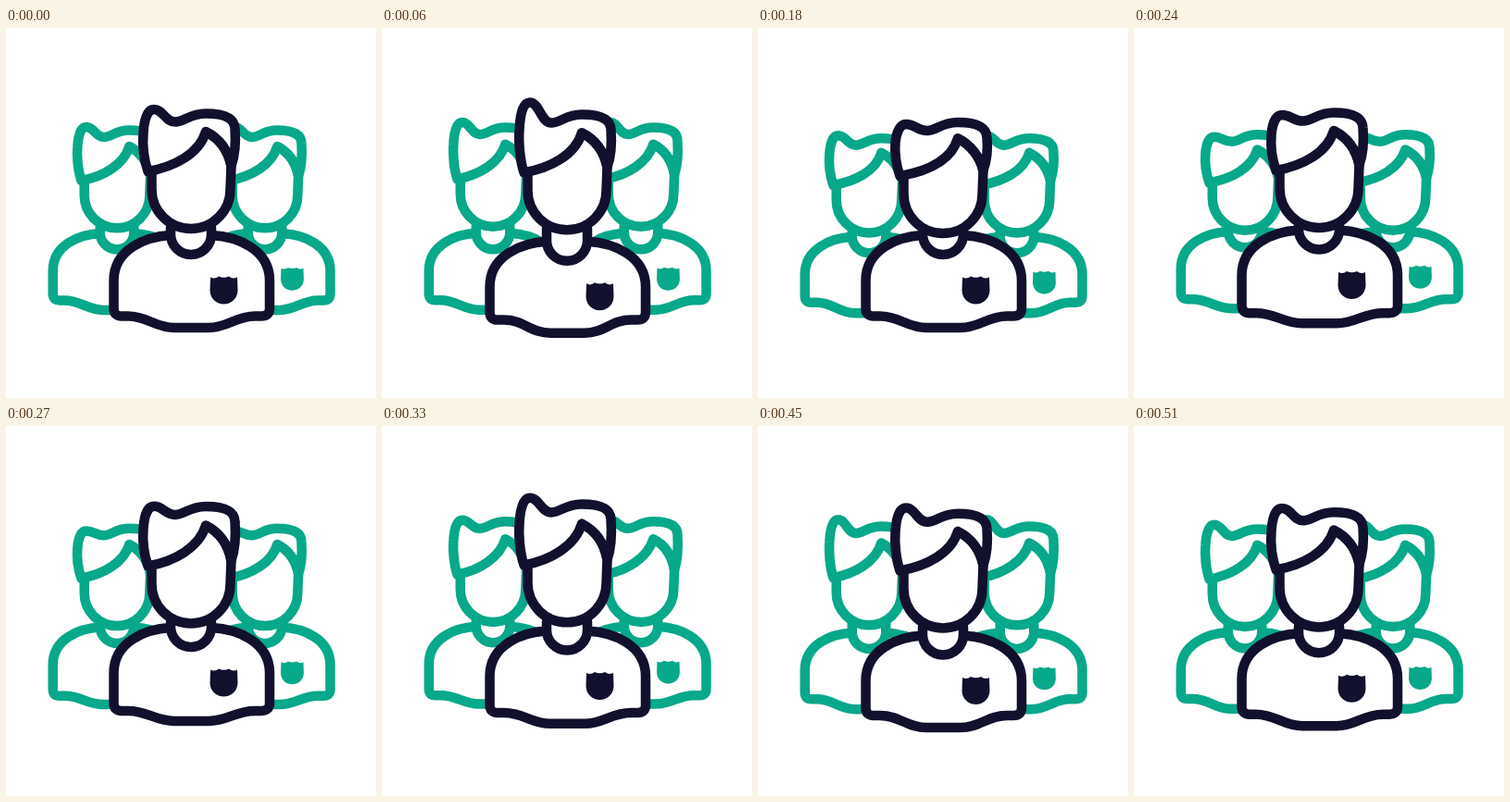
These frames come from a looping animation (400x400 px, 540 ms). An HTML page with a canvas:

```html
<!DOCTYPE html>
<html lang="en">
<head>
<meta charset="utf-8">
<title>Team bounce</title>
<style>
html, body { margin: 0; width: 100%; height: 100%; overflow: hidden; background: #fff; }
canvas { display: block; width: 400px; height: 400px; }
</style>
</head>
<body>
<canvas id="stage" width="400" height="400"></canvas>
<script>
const ctx = document.getElementById('stage').getContext('2d');
const LOOP = 540, STEP = 30, PERIOD = 360, RAMP = 60;
const LAG = 45; // the side figures follow the front one

// Fading swing; parts further from the hips swing wider and later.
function swing(t, size, delay) {
  const ramp = Math.min(1, t / RAMP, (LOOP - t) / RAMP);
  const fade = 1 - (t / LOOP) ** 2;
  return size * ramp * fade * Math.sin(2 * Math.PI * (t - delay) / PERIOD);
}

function person(cx, scale, dy, lift, color, time) {
  const t = (time + LOOP) % LOOP;
  const b = swing(t, 8, 0);            // shoulders, neck and badge
  const hem = b * 0.85, c = b * 0.6;   // bottom edge and its corners
  const h = swing(t, 7.5, 50);         // head
  const r = swing(t, 13, 55) - lift;   // top of the hair
  const tip = swing(t, 18, 85) - lift; // quiff
  const m = (h + tip) / 2, p = (h + r) / 2;

  // Geometry is scaled, line weight is not.
  function shape(build, fill, line = true) {
    ctx.setTransform(scale, 0, 0, scale, cx - 200 * scale, dy);
    ctx.beginPath();
    build();
    ctx.setTransform(1, 0, 0, 1, 0, 0);
    ctx.fillStyle = fill;
    ctx.fill();
    if (line) ctx.stroke();
  }
  const move = (x, y) => ctx.moveTo(x, y);
  const to = (x, y) => ctx.lineTo(x, y);
  const curve = (...a) => ctx.bezierCurveTo(...a);
  const bend = (...a) => ctx.quadraticCurveTo(...a);
  const parting = () => curve(240, 132 + p, 230, 119 + p, 216, 112 + p);

  ctx.strokeStyle = color;
  ctx.lineWidth = 10.5;
  ctx.lineJoin = ctx.lineCap = 'round';

  // Torso
  shape(() => {
    move(178, 224 + b);
    curve(151, 225.5 + b, 116.5, 239 + b, 116.5, 273 + b);
    to(116.5, 303 + c);
    bend(116.5, 311.5 + c, 125, 311.5 + c);
    to(132, 311.5 + c);
    curve(153, 311.5 + c, 161, 324 + hem, 182, 324 + hem);
    to(219, 324 + hem);
    curve(240, 324 + hem, 248, 311.5 + c, 269, 311.5 + c);
    to(276, 311.5 + c);
    bend(285, 311.5 + c, 285, 303 + c);
    to(285, 273 + b);
    curve(285, 239 + b, 250, 225.5 + b, 222, 224 + b);
  }, '#fff');

  // Neck
  shape(() => {
    move(178, 216 + h);
    to(178, 223 + b);
    ctx.arc(200, 223 + b, 22, Math.PI, 0, true);
    to(222, 216 + h);
  }, '#fff');

  // Badge
  shape(() => {
    move(221, 269.5 + b);
    bend(226, 272 + b, 230, 268.5 + b);
    bend(235.5, 271 + b, 241, 268.5 + b);
    bend(245, 272 + b, 250, 269.5 + b);
    to(250.5, 284 + b);
    curve(250, 294 + b, 242, 298.5 + b, 235.5, 298.5 + b);
    curve(229, 298.5 + b, 221, 294 + b, 220.5, 284 + b);
  }, color, false);

  // Face
  shape(() => {
    move(157.5, 155 + h);
    to(157.5, 174.5 + h);
    ctx.arc(200, 174.5 + h, 42.5, Math.PI, 0, true);
    to(243.5, 149 + h);
    parting();
  }, '#fff');

  // Hair
  shape(() => {
    move(153.5, 155 + h);
    curve(149, 142 + h, 147.5, 125 + m, 148.5, 113 + m);
    curve(149.5, 98 + tip, 153, 88 + tip, 160, 88 + tip);
    curve(170, 88 + tip, 172, 101.5 + r, 183, 101.5 + r);
    curve(193, 101.5 + r, 198, 92.5 + r, 216, 92.5 + r);
    curve(236, 92.5 + r, 247, 97 + r, 247.5, 109 + r);
    curve(248.5, 122 + p, 248.5, 135 + h, 243.5, 149 + h);
    parting();
    curve(209, 136 + p, 182, 150 + h, 153.5, 155 + h);
    ctx.closePath();
  }, '#fff');
}

function draw(now) {
  const t = Math.floor((now % LOOP) / STEP) * STEP;
  ctx.fillStyle = '#fff';
  ctx.fillRect(0, 0, 400, 400);
  for (const x of [120, 280]) person(x, 0.83, 35.5, 3.6, '#08a88a', t - LAG);
  person(200, 1, 0, 0, '#11102d', t);
}

const start = performance.now();
function loop() {
  draw(performance.now() - start);
  requestAnimationFrame(loop);
}
loop();
</script>
</body>
</html>
```
